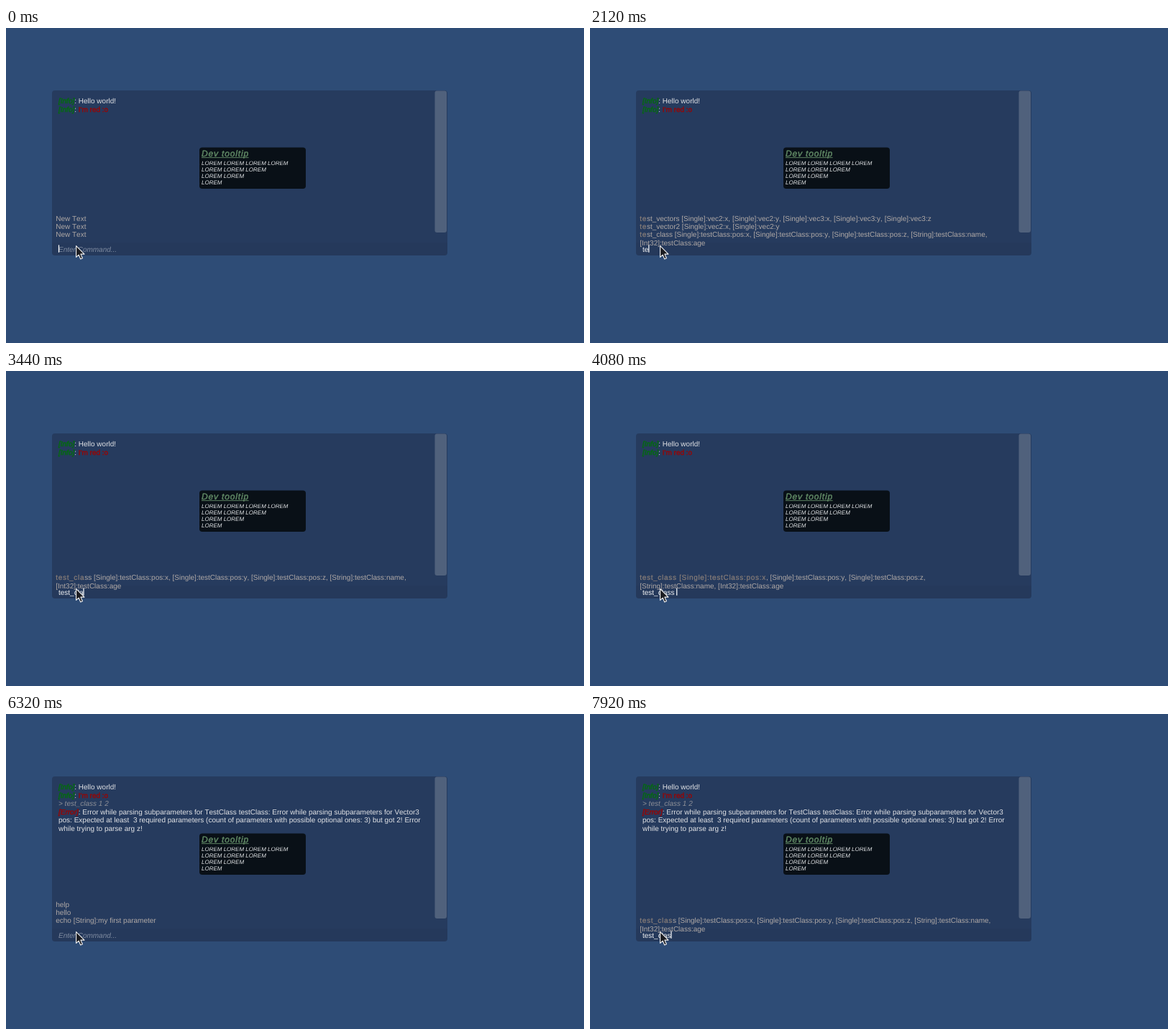
These frames come from a looping animation (804 by 439 pixels, 8 s). An HTML page:

```html
<!DOCTYPE html>
<html lang="en">
<head>
<meta charset="utf-8">
<title>Developer console</title>
<style>
  html, body { margin: 0; width: 100%; height: 100%; overflow: hidden; background: #2e4c76; }
  svg { display: block; width: 804px; height: 439px; }
  text {
    font: 10px "Liberation Sans", Arial, sans-serif;
    font-kerning: none;
    text-rendering: geometricPrecision;
    white-space: pre;
  }
  .log text { fill: #e2e3e6; }
  .log .info { fill: #046a10; stroke: #046a10; stroke-width: .5px; font-style: italic; }
  .log .error { fill: #920808; stroke: #920808; stroke-width: .5px; font-style: italic; }
  .log .red { fill: #960606; stroke: #960606; stroke-width: .4px; }
  .log .echo { fill: #8e9097; font-style: italic; }
  .tip text { font-size: 8px; font-style: italic; fill: #e4e6e8; }
  .tip .title { font-size: 12px; letter-spacing: .84px; fill: #618a66; stroke: #618a66; stroke-width: .45px; }
  #hints { fill: #b0a9a6; }
  #hints .hit { fill: #8a7f79; stroke: #8a7f79; stroke-width: .2px; letter-spacing: .7px; }
  #hint { fill: #7f8ba0; font-style: italic; }
  #input { fill: #f0f1f3; }
</style>
</head>
<body>
<svg viewBox="0 0 804 439" xml:space="preserve">
  <rect width="804" height="439" fill="#2e4c76"/>
  <rect x="64" y="87" width="550" height="230" rx="4" fill="#263b5e"/>
  <path d="M64 299H614V313a4 4 0 0 1-4 4H68a4 4 0 0 1-4-4Z" fill="#000" opacity=".03"/>
  <rect x="596.5" y="87.5" width="16.5" height="197.5" rx="3" fill="#50617c"/>
  <g class="log">
    <text x="73" y="105.3"><tspan class="info">[Info]</tspan>: Hello world!</text>
    <text x="73" y="116.8"><tspan class="info">[Info]</tspan>: <tspan class="red">I'm red :o</tspan></text>
    <g id="result">
      <text x="73" y="128.2" class="echo">&gt; test_class 1 2</text>
      <text x="73" y="139.7"><tspan class="error">[Error]</tspan>: Error while parsing subparameters for TestClass testClass: Error while parsing subparameters for Vector3</text>
      <text x="73" y="151.2">pos: Expected at least  3 required parameters (count of parameters with possible optional ones: 3) but got 2! Error</text>
      <text x="73" y="162.7">while trying to parse arg z!</text>
    </g>
  </g>
  <g class="tip">
    <rect x="269" y="166.5" width="148" height="57.5" rx="4" fill="#091017"/>
    <text x="272" y="190.6">LOREM LOREM LOREM LOREM</text>
    <rect x="271" y="183.5" width="124" height="2" fill="#091017"/>
    <text x="272" y="199.8">LOREM LOREM LOREM</text>
    <text x="272" y="209">LOREM LOREM</text>
    <text x="272" y="218.2">LOREM</text>
    <text x="272" y="178.8" class="title">Dev tooltip</text>
    <rect x="272" y="180.2" width="65.6" height=".9" fill="#618a66"/>
  </g>
  <g id="hints"></g>
  <text id="hint" x="73" y="311.6">Enter Command...</text>
  <text id="input" x="73" y="311.6" xml:space="preserve"></text>
  <rect id="caret" y="302.4" width="1.2" height="10.4" fill="#fff"/>
  <path d="M97.6 303.6V319.4L101.2 316.1L103.7 322L106.4 320.8L103.9 315.1H109Z" fill="#1b1c21" stroke="#f4f4f4" stroke-width="1.1" stroke-linejoin="round"/>
</svg>
<script>
  const LOOP = 8000;
  const ENTERED = 4920;
  const byId = id => document.getElementById(id);
  const [result, hints, hint, input, caret] = ['result', 'hints', 'hint', 'input', 'caret'].map(byId);

  // [time, typed text, caret visible]
  const steps = [[0, '', true], [40, '', false], [600, '', true], [1200, '', false]];
  const type = (text, times) =>
    times.forEach((time, i) => steps.push([time, text.slice(0, i + 1), true]));
  type('test_class 1 2', [1760, 2120, 2320, 2520, 3120, 3240, 3320, 3440, 3560, 3720, 4080, 4320, 4480, 4520]);
  steps.push([ENTERED, '', true], [5120, '', false], [5720, '', true], [6320, '', false]);
  type('test_clas', [6560, 6720, 6880, 7040, 7320, 7600, 7720, 7800, 7920]);

  const singles = (path, axes) => [...axes].map(axis => `[Single]:${path}:${axis}`);
  const commands = [
    { name: 'test_vectors', params: [...singles('vec2', 'xy'), ...singles('vec3', 'xyz')] },
    { name: 'test_vector2', params: singles('vec2', 'xy') },
    { name: 'test_class', params: [...singles('testClass:pos', 'xyz'), '[String]:testClass:name', '[Int32]:testClass:age'] },
  ];
  const idleBefore = ['New Text', 'New Text', 'New Text'];
  const idleAfter = ['help', 'hello', 'echo [String]:my first parameter'];

  const hit = text => `<tspan class="hit">${text}</tspan>`;

  // Returns the lines of one suggestion, with the entered part highlighted.
  function describe({ name, params }, typed) {
    const [word, ...args] = typed.split(' ');
    const parts = params.map((param, i) => i && i < args.length ? hit(param) : param);
    const head = args.length
      ? hit(`${name} ${parts[0]}`)
      : `${hit(word)}${name.slice(word.length)} ${parts[0]}`;
    const all = [head, ...parts.slice(1)];
    if (name !== 'test_class') return [all.join(', ')];
    const wrap = args.length ? 3 : 4;
    return [all.slice(0, wrap).join(', ') + ',', all.slice(wrap).join(', ')];
  }

  function suggestions(typed, time) {
    if (!typed) return (time < ENTERED ? idleBefore : idleAfter).map(line => [line]);
    const word = typed.split(' ')[0];
    return commands.filter(c => c.name.startsWith(word)).map(c => describe(c, typed));
  }

  function show([time, typed, caretOn]) {
    result.style.display = time >= ENTERED ? '' : 'none';
    hint.style.display = typed ? 'none' : '';
    input.textContent = typed;
    const items = suggestions(typed, time);
    hints.innerHTML = items.map((lines, i) => {
      const y = 291.2 - (items.length - 1 - i) * 11.05;
      return lines.map((line, row) =>
        `<text x="69.2" y="${y + row * 11.5}" xml:space="preserve">${line}</text>`).join('');
    }).join('');
    caret.setAttribute('x', 72.9 + (typed ? input.getComputedTextLength() : 0));
    caret.style.display = caretOn ? '' : 'none';
  }

  let current;
  function tick() {
    const time = performance.now() % LOOP;
    const step = steps.findLast(s => s[0] <= time);
    if (step !== current) show(current = step);
    requestAnimationFrame(tick);
  }
  tick();
</script>
</body>
</html>
```
